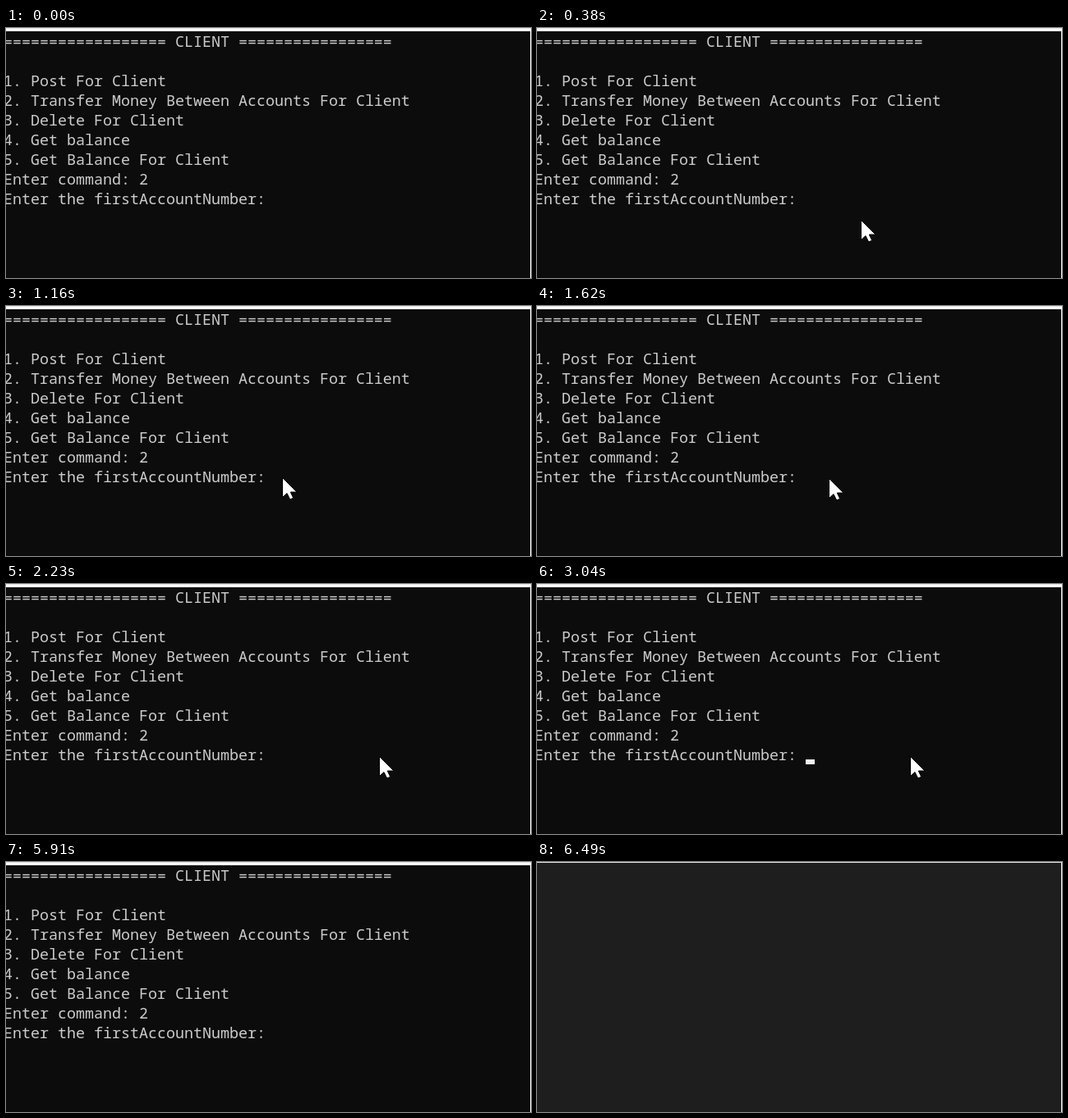
Write an HTML page that moves like this. It is 639 px wide and 305 px high and loops after 8 s.

```html
<!DOCTYPE html>
<html lang="en">
<head>
<meta charset="utf-8">
<title>Console client</title>
<style>
  html, body { margin: 0; width: 100%; height: 100%; overflow: hidden; background: #fff; }
  svg { display: block; width: 639px; height: 305px; }
  text { font: 18.333px "Noto Sans Mono", "DejaVu Sans Mono", monospace; fill: #ccc; white-space: pre; }
  .caret, .mouse, .blank { animation: 8s step-end infinite; }
  .caret { fill: #f2f2f2; animation-name: blink; }
  .mouse { fill: #fff; stroke: #000; animation-name: move; }
  .blank { fill: #1e1e1e; animation-name: close; }

  @keyframes blink {
    0%, 27.875%, 39.125%, 73.875%, 100% { visibility: hidden; }
    21.125%, 38%, 44.875% { visibility: visible; }
  }
  @keyframes close {
    0% { visibility: hidden; }
    81.125%, 100% { visibility: visible; }
  }
  @keyframes move {
    0% { visibility: hidden; transform: translate(444px, 276px); }
    3% { visibility: visible; transform: translate(444px, 276px); }
    3.875% { transform: translate(417px, 252px); }
    4.75% { transform: translate(395px, 235px); }
    5.5% { transform: translate(378px, 229px); }
    6.25% { transform: translate(365px, 225px); }
    7.125% { transform: translate(355px, 222px); }
    7.875% { transform: translate(348px, 220px); }
    8.625% { transform: translate(344px, 219px); }
    9.5% { transform: translate(342px, 218px); }
    12.25% { transform: translate(341px, 217px); }
    13% { transform: translate(340px, 214px); }
    14.5% { transform: translate(337px, 210px); }
    15.25% { transform: translate(318px, 199px); }
    16% { transform: translate(309px, 194px); }
    16.875% { transform: translate(330px, 205px); }
    20.25% { transform: translate(356px, 211px); }
    21.125% { transform: translate(405px, 214px); }
    22% { transform: translate(443px, 212px); }
    22.75% { visibility: visible; transform: translate(455px, 211px); }
    44.875%, 100% { visibility: hidden; transform: translate(455px, 211px); }
  }
</style>
</head>
<body>
<svg viewBox="0 0 639 305">
  <rect width="639" height="305" fill="#fff"/>
  <rect width="639" height="1" fill="#e4e4e4"/>
  <rect y="4" width="638" height="301" fill="#0c0c0c"/>
  <g>
    <text x="-3" y="23">================== CLIENT =================</text>
    <text x="-3" y="71">1. Post For Client</text>
    <text x="-3" y="95">2. Transfer Money Between Accounts For Client</text>
    <text x="-3" y="119">3. Delete For Client</text>
    <text x="-3" y="143">4. Get balance</text>
    <text x="-3" y="167">5. Get Balance For Client</text>
    <text x="-3" y="191">Enter command: 2</text>
    <text x="-3" y="215">Enter the firstAccountNumber:</text>
  </g>
  <rect class="caret" x="327" y="214" width="11" height="6"/>
  <path class="mouse" d="M-.5 -.5V23.5L5 18.5L8.7 26L12.7 24.2L9.3 17H17Z"/>
  <rect class="blank" y="1" width="638" height="304"/>
</svg>
</body>
</html>
```
